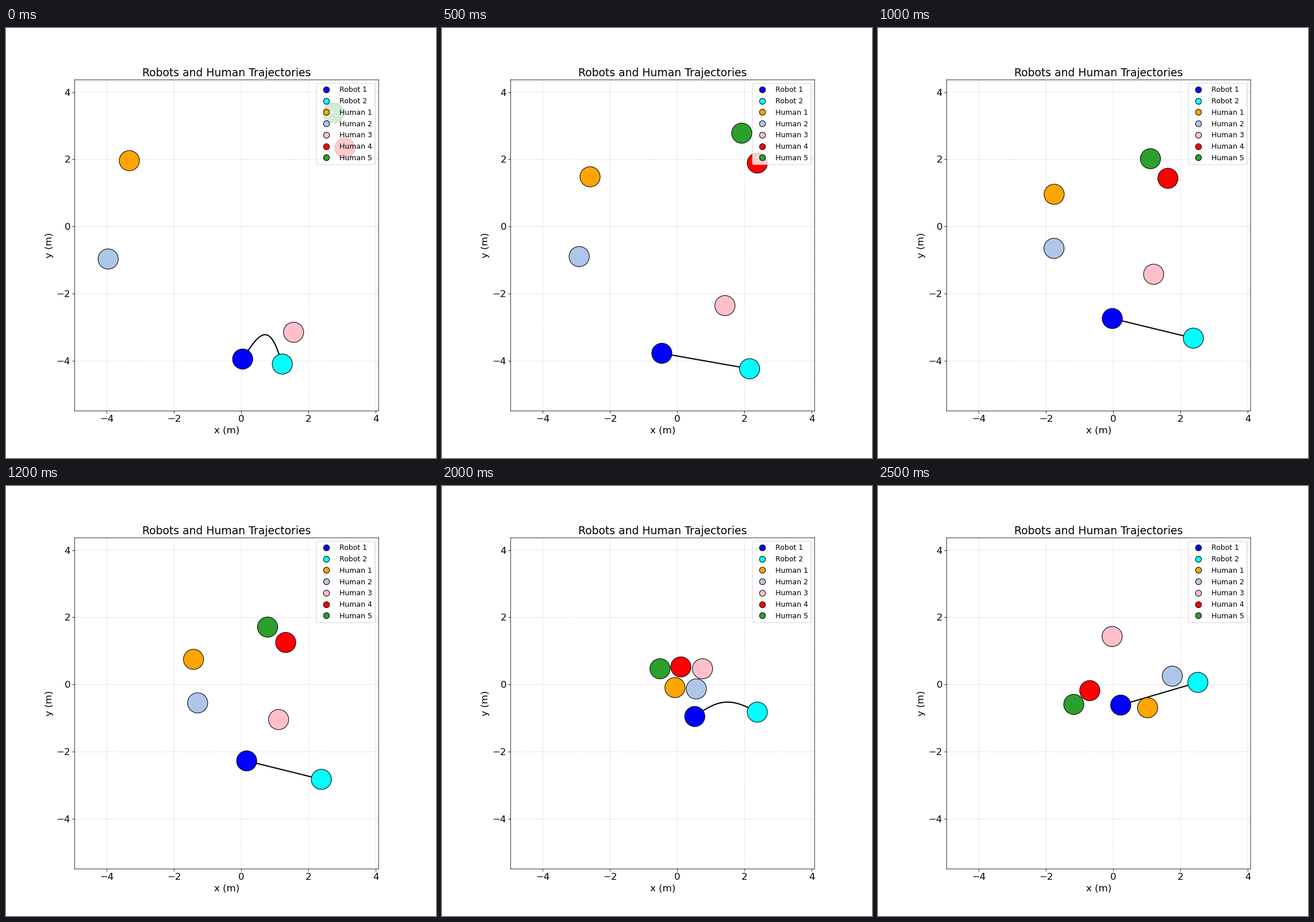
Write a matplotlib script that moves like this. It is 748 px wide and 748 px high and loops after 2.6 s.

```python
import numpy as np
import matplotlib.pyplot as plt
from matplotlib.animation import FuncAnimation
from matplotlib.lines import Line2D

STEPS, STEP_MS, STAGE = 26, 100, 748
LAST, MEET = STEPS - 1, 20  # humans crowd together at step MEET
RADIUS, ROPE_LENGTH, SETTLE = 0.3, 2.0, 2.0


def human(start, velocity, meet, end):
    """Settle from start onto a straight walk to meet, then head for end."""
    start, velocity, meet, end = map(np.array, (start, velocity, meet, end))
    drift = start - (meet - MEET * velocity)

    def place(k):
        if k > MEET:
            return meet + (end - meet) * (k - MEET) / (LAST - MEET)
        return meet + velocity * (k - MEET) + drift * np.exp(-k / SETTLE)
    return place


def robot(*legs):
    """Each leg is (first step, point, sideways bulge on the way to the next)."""
    def place(k):
        for (k0, p0, bulge), (k1, p1, _) in zip(legs, legs[1:]):
            if k <= k1:
                break
        t = (k - k0) / (k1 - k0)
        p0, p1, bulge = map(np.array, (p0, p1, bulge))
        return p0 + t * (p1 - p0) + np.sin(np.pi * t) * bulge
    return place


STRAIGHT = (0, 0)
AGENTS = [
    ("Robot 1", "blue", robot(
        (0, (0.04, -3.94), (0, -0.15)), (5, (-0.46, -3.77), STRAIGHT),
        (8, (-0.22, -3.20), STRAIGHT), (12, (0.16, -2.27), STRAIGHT),
        (16, (0.46, -1.55), (0, -0.17)), (MEET, (0.52, -0.95), (0, -0.2)),
        (LAST, (0.22, -0.61), STRAIGHT))),
    ("Robot 2", "cyan", robot(
        (0, (1.22, -4.09), (0, -0.31)), (5, (2.15, -4.23), STRAIGHT),
        (6, (2.38, -4.32), STRAIGHT), (MEET, (2.38, -0.82), (0.17, 0)),
        (LAST, (2.515, 0.065), STRAIGHT))),
    ("Human 1", "orange",
     human((-3.33, 1.96), (0.169, -0.105), (-0.07, -0.09), (1.02, -0.69))),
    ("Human 2", "#aec7e8",
     human((-3.96, -0.965), (0.233, 0.052), (0.565, -0.13), (1.755, 0.25))),
    ("Human 3", "pink",
     human((1.555, -3.145), (-0.045, 0.189), (0.75, 0.47), (-0.035, 1.43))),
    ("Human 4", "red",
     human((3.08, 2.34), (-0.152, -0.091), (0.105, 0.525), (-0.70, -0.18))),
    ("Human 5", "#2ca02c",
     human((2.74, 3.375), (-0.162, -0.155), (-0.515, 0.47), (-1.175, -0.59))),
]


def rope_points(start, end):
    """Slack rope as a half sine bulging to the left of the chord."""
    chord = end - start
    dist = np.hypot(*chord)
    sag = 0.5 * np.sqrt(max(ROPE_LENGTH**2 - dist**2, 0))
    normal = np.array([-chord[1], chord[0]]) / dist
    t = np.linspace(0, 1, 80)[:, None]
    return start + t * chord + sag * np.sin(np.pi * t) * normal


plt.rcParams.update({"font.family": "DejaVu Sans", "path.snap": False})
fig = plt.figure(figsize=(10, 10), dpi=STAGE / 10)
ax = fig.add_axes([119.3 / STAGE, 81.9 / STAGE, 528.8 / STAGE, 576 / STAGE])
ax.set_xlim(-4.959, 4.083)
ax.set_ylim(-5.484, 4.366)
ax.set_xticks(range(-4, 5, 2))
ax.set_yticks(range(-4, 5, 2))
ax.tick_params(labelsize=16)
ax.set_xlabel("x (m)", fontsize=16)
ax.set_ylabel("y (m)", fontsize=16)
ax.set_title("Robots and Human Trajectories", fontsize=18)
ax.grid(True, linestyle="--", alpha=0.5)

rope, = ax.plot([], [], color="black", linewidth=2, zorder=2)
discs = [ax.add_patch(plt.Circle((0, 0), RADIUS, facecolor=color,
                                 edgecolor="black", zorder=3))
         for _, color, _ in AGENTS]
handles = [Line2D([0], [0], marker="o", color="w", label=name, markersize=10,
                  markerfacecolor=color, markeredgecolor="black")
           for name, color, _ in AGENTS]
ax.legend(handles=handles, loc="upper right", fontsize=12, labelspacing=0.54)


def update(k):
    places = [place(k) for _, _, place in AGENTS]
    for disc, center in zip(discs, places):
        disc.center = tuple(center)
    rope.set_data(*rope_points(places[0], places[1]).T)
    return [rope, *discs]


anim = FuncAnimation(fig, update, frames=STEPS, interval=STEP_MS,
                     repeat=True, repeat_delay=0)
plt.show()
```
